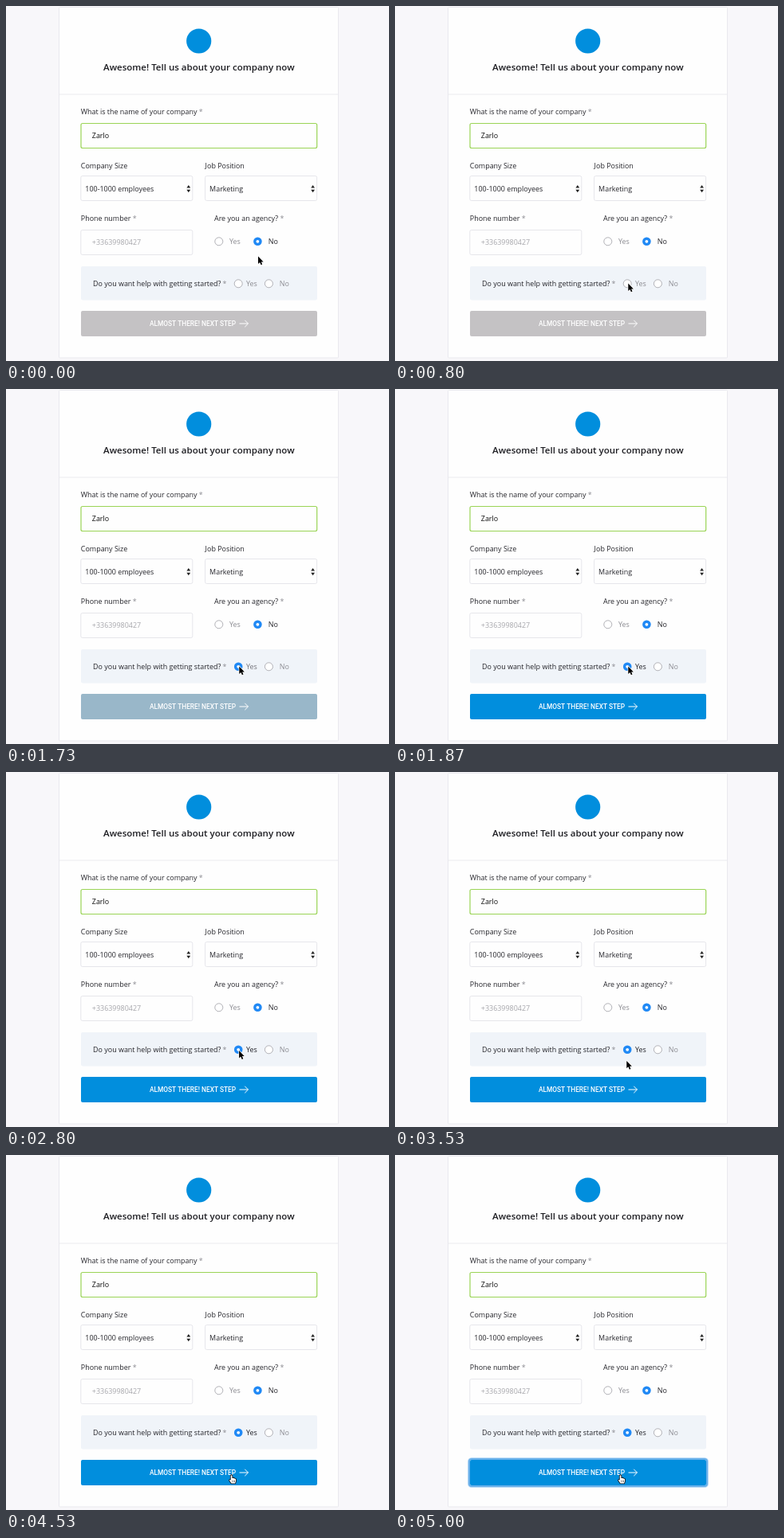
Recreate the animation shown at these times as an HTML page with a canvas. Size 480 by 446 pixels, loop 5070 ms.

```html
<!DOCTYPE html>
<html lang="en">
<head>
<meta charset="utf-8">
<title>Company form</title>
<style>
  html, body { margin: 0; width: 100%; height: 100%; overflow: hidden; background: #f8f7fa; }
  canvas { display: block; width: 480px; height: 446px; }
</style>
</head>
<body>
<canvas id="stage"></canvas>
<script>
const W = 480, H = 446, LOOP = 5070, STEP = LOOP / 76;
const canvas = document.getElementById('stage');
const ratio = window.devicePixelRatio || 1;
canvas.width = W * ratio;
canvas.height = H * ratio;
const ctx = canvas.getContext('2d');

const DARK = '#26262c', MUTED = '#8d8d93', BLUE = '#018edd', RADIO = '#2089f5';
const BODY = '8.95px "Open Sans", sans-serif';
const TITLE = '600 11.52px "Open Sans", sans-serif';
const BUTTON = '500 8.32px Roboto, sans-serif';

// Pointer path: time, x, y
const PATH = [
  [0, 316, 314.5], [200, 310, 324], [400, 297.5, 341], [530, 293.5, 346.5], [800, 292.3, 348.5],
  [2670, 292.3, 348.5], [3130, 291.6, 354], [3530, 290, 364.5], [3730, 288, 377],
  [3930, 284, 397], [4070, 282.5, 402], [LOOP, 282.5, 402]
];

const clamp = v => Math.max(0, Math.min(1, v));
const mix = (a, b, k) => a + (b - a) * k;
const blend = (a, b, k) => `rgb(${a.map((v, i) => Math.round(mix(v, b[i], k)))})`;
const ease = k => k * k * (3 - 2 * k);

function pointerAt(t) {
  let i = 0;
  while (i < PATH.length - 2 && t >= PATH[i + 1][0]) i++;
  const [t0, x0, y0] = PATH[i], [t1, x1, y1] = PATH[i + 1];
  const k = clamp((t - t0) / (t1 - t0));
  return [mix(x0, x1, k), mix(y0, y1, k)];
}

function box(x, y, w, h, r, fill, line, width = 1) {
  ctx.beginPath();
  ctx.roundRect(x, y, w, h, r);
  if (fill) { ctx.fillStyle = fill; ctx.fill(); }
  if (line) { ctx.strokeStyle = line; ctx.lineWidth = width; ctx.stroke(); }
}

function text(str, x, y, color = DARK, font = BODY) {
  ctx.font = font;
  ctx.fillStyle = color;
  ctx.fillText(str, x, y);
}

function label(str, x, y, required) {
  text(str, x, y);
  if (required) text('*', x + ctx.measureText(str + ' ').width, y, MUTED);
}

function disc(x, y, r, fill, line) {
  ctx.beginPath();
  ctx.arc(x, y, r, 0, Math.PI * 2);
  ctx.fillStyle = fill;
  ctx.fill();
  if (line) { ctx.strokeStyle = line; ctx.lineWidth = 0.9; ctx.stroke(); }
}

function radio(x, y, on, pressed) {
  if (on) {
    disc(x, y, 5.3, RADIO);
    disc(x, y, 1.9, '#fff');
  } else {
    disc(x, y, 5, pressed ? '#dfe0e3' : '#fff', '#a9a9ae');
  }
}

function poly(points, fill) {
  ctx.beginPath();
  points.forEach(([x, y]) => ctx.lineTo(x, y));
  ctx.closePath();
  ctx.fillStyle = fill;
  ctx.fill();
}

function select(x, w, str) {
  box(x, 213.5, w, 31, 2, '#fefefe', '#e6e6eb');
  text(str, x + 5.5, 232.6);
  const a = x + w - 5;
  poly([[a - 2.4, 228.4], [a, 225], [a + 2.4, 228.4]], '#222');
  poly([[a - 2.4, 230.8], [a, 234.2], [a + 2.4, 230.8]], '#222');
}

function button(active, focused) {
  if (focused) {
    box(92.2, 381.2, 299.6, 35.6, 4, null, 'rgba(105,175,235,.45)', 2.6);
    box(93, 382, 298, 34, 3, null, '#69b0ea', 2);
  }
  box(94, 383, 296, 32, 2, blend([196, 194, 196], [1, 142, 221], active));
  text('ALMOST THERE! NEXT STEP', 180, 402, '#fff', BUTTON);
  ctx.beginPath();
  ctx.moveTo(292.5, 399);
  ctx.lineTo(303.5, 399);
  ctx.moveTo(299.3, 394.8);
  ctx.lineTo(303.5, 399);
  ctx.lineTo(299.3, 403.2);
  ctx.strokeStyle = '#fff';
  ctx.lineWidth = 1;
  ctx.stroke();
}

function shape(x, y, d, fill, line, width) {
  const p = new Path2D(d);
  ctx.save();
  ctx.translate(x, y);
  ctx.lineJoin = 'round';
  ctx.strokeStyle = line;
  ctx.lineWidth = width;
  ctx.stroke(p);
  ctx.fillStyle = fill;
  ctx.fill(p);
  ctx.restore();
}

const ARROW = 'M0 0V9.4L2.1 7.4L3.6 10.8L5.2 10.1L3.8 6.9H6.6Z';
const HAND = 'M-.8 .8Q0-.5 .9.8V4Q2 3.2 2.6 4.3Q3.7 3.6 4.2 4.8Q5.6 4.5 5.6 6V7.6L4.7 10.4H0L-2.4 6.9Q-2.7 5.4-.8 6.4Z';

function pointer(t) {
  const [x, y] = pointerAt(t);
  if (y > 383) {
    shape(x, y, HAND, '#fff', '#111', 1.7);
    ctx.fillStyle = '#222';
    for (const dx of [1, 2.4, 3.8]) ctx.fillRect(x + dx, y + 6.6, 0.5, 2.4);
  } else {
    shape(x, y, ARROW, '#000', '#fff', 1.4);
  }
}

function draw(t) {
  ctx.setTransform(ratio, 0, 0, ratio, 0, 0);
  ctx.fillStyle = '#f8f7fa';
  ctx.fillRect(0, 0, W, H);

  const active = ease(clamp((t - 1680) / 180));
  const chosen = t >= 1690;

  box(66.5, 1.5, 350, 440.5, 1, '#fefefe', '#e9e9ee');
  ctx.fillStyle = '#ebebef';
  ctx.fillRect(67, 110.5, 349, 1);
  disc(241.7, 44, 15.6, BLUE);
  ctx.textAlign = 'center';
  text('Awesome! Tell us about your company now', 241.8, 81, '#1d1d22', TITLE);
  ctx.textAlign = 'left';

  label('What is the name of your company', 93.8, 136.2, true);
  box(94, 147.5, 295.7, 31, 2, '#fefefe', '#9ad455', 1.2);
  text('Zarlo', 107.8, 166.2, '#111');

  label('Company Size', 93.8, 204);
  label('Job Position', 249.6, 204);
  select(93.8, 140, '100-1000 employees');
  select(249.6, 140, 'Marketing');

  label('Phone number', 93.8, 270.3, true);
  box(93.8, 281.5, 140, 31, 2, '#fefefe', '#e6e6eb');
  text('+33639980427', 107.8, 300.3, '#a6a6ab');

  label('Are you an agency?', 261, 270.3, true);
  radio(266.8, 295.8, false);
  text('Yes', 280, 298.7, MUTED);
  radio(315.4, 295.8, true);
  text('No', 328.8, 298.7);

  box(94, 327, 296, 42.5, 2, '#f0f4f9');
  label('Do you want help with getting started?', 109, 351.7, true);
  radio(291.2, 348.8, chosen, t >= 1600);
  text('Yes', 301, 351.7, blend([141, 141, 147], [38, 38, 44], active));
  radio(329.4, 348.8, false);
  text('No', 342.8, 351.7, MUTED);

  button(active, t >= 4600);
  pointer(t);
}

function tick(now) {
  const t = now % LOOP;
  draw(Math.floor((t + 4) / STEP) % 76 * STEP);
  requestAnimationFrame(tick);
}
requestAnimationFrame(tick);
</script>
</body>
</html>
```
